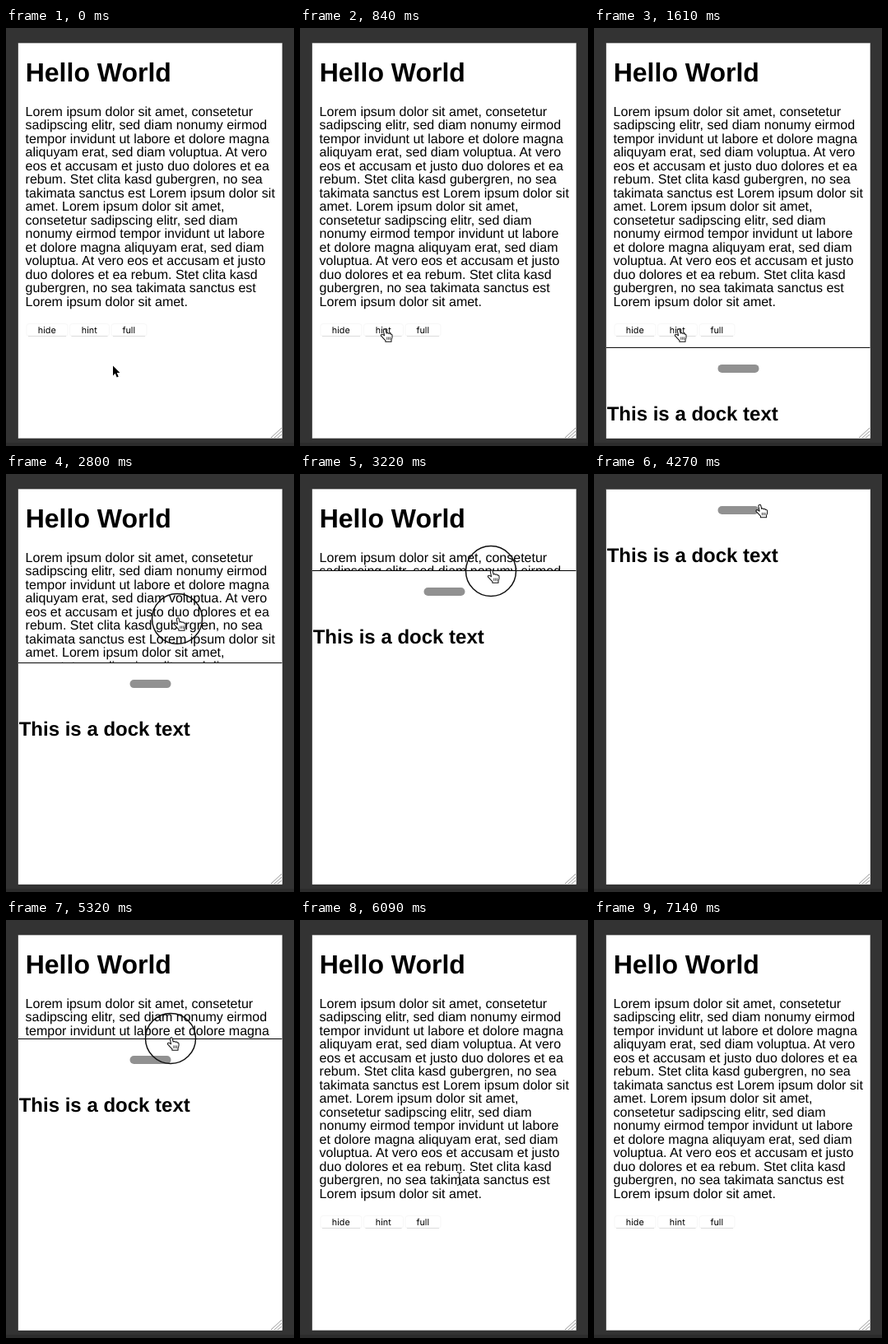
Write an HTML page that moves like this. It is 350x508 px and loops after 7.28 s.

```html
<!DOCTYPE html>
<html lang="en">
<head>
<meta charset="utf-8">
<title>Dock demo</title>
<style>
  html, body { margin: 0; width: 100%; height: 100%; overflow: hidden; background: #333; }
  svg { display: block; width: 350px; height: 508px; }
  text { font-family: "Liberation Sans", Arial, sans-serif; text-rendering: geometricPrecision; }
  .bold { font-weight: 700; }
  .label { font: 10.8px Inter, sans-serif; text-anchor: middle; }
</style>
</head>
<body>
<svg viewBox="0 0 350 508">
  <clipPath id="page"><rect x="15" y="18.5" width="320.5" height="480"/></clipPath>
  <rect width="350" height="508" fill="#333"/>
  <rect y="504" width="350" height="4" fill="#2c2c2c"/>
  <rect x="15" y="18.5" width="320.5" height="480" stroke="#777"/>
  <g clip-path="url(#page)">
    <rect width="350" height="508" fill="#fff"/>
    <text class="bold" x="23.7" y="65.2" font-size="32">Hello World</text>
    <g id="copy" font-size="16"></g>
    <g id="buttons"></g>
    <g id="dock">
      <rect width="350" height="500" fill="#fff"/>
      <rect width="350" height="1"/>
      <rect x="150.5" y="21" width="50" height="10" rx="5" fill="#919191"/>
      <text class="bold" x="15.7" y="89.2" font-size="24">This is a dock text</text>
    </g>
    <path d="M322 498L335 486M326 498L335 490M330 498L335 494" stroke="#999" fill="none"/>
  </g>
  <g id="pointer">
    <circle id="ring" fill="none" stroke="#111" stroke-width="1.5"/>
    <path id="arrow" transform="scale(.88)" d="M0 0V13.5L3.1 10.6L5.3 15.9L7.6 15L5.4 9.8H9.6Z" stroke="#fff" paint-order="stroke" stroke-width="1.6"/>
    <g id="hand" transform="translate(0 -.7) scale(.94)" fill="#fff" stroke="#111" stroke-width="1.1" stroke-linejoin="round">
      <path d="M0 0C1-1 2-.5 2.3 .6L3.4 5C4 4 5.6 4.2 6 5.4C7 4.7 8.3 5 8.6 6.2C9.6 5.8 10.6 6.4 10.7 7.6C11 10 10.6 11.6 9.6 13.5V16H2V14.2C0 12.4-1.8 10.2-3.4 8.6C-4.8 7.2-3 5.6-1.2 6.8L.6 8L-.7 1.6C-.8 .9-.5 .3 0 0Z"/>
      <path d="M4 9.8v3.6M6 9.8v3.6M8 9.8v3.6" stroke-width=".8"/>
    </g>
    <path id="beam" d="M-3-8Q0-8 0-6Q0-8 3-8M0-6V6M-3 8Q0 8 0 6Q0 8 3 8" fill="none" stroke="#111"/>
  </g>
</svg>
<script>
const LOOP = 7280, STEP = 70;
const HIDDEN = 500, HINT = 387, FULL = 18;
const $ = id => document.getElementById(id);

const copy = `Lorem ipsum dolor sit amet, consetetur
sadipscing elitr, sed diam nonumy eirmod
tempor invidunt ut labore et dolore magna
aliquyam erat, sed diam voluptua. At vero
eos et accusam et justo duo dolores et ea
rebum. Stet clita kasd gubergren, no sea
takimata sanctus est Lorem ipsum dolor sit
amet. Lorem ipsum dolor sit amet,
consetetur sadipscing elitr, sed diam
nonumy eirmod tempor invidunt ut labore
et dolore magna aliquyam erat, sed diam
voluptua. At vero eos et accusam et justo
duo dolores et ea rebum. Stet clita kasd
gubergren, no sea takimata sanctus est
Lorem ipsum dolor sit amet.`;
$('copy').innerHTML = copy.split('\n')
  .map((line, i) => `<text x="23.6" y="${106.6 + i * 16.5}">${line}</text>`).join('');

$('buttons').innerHTML = [['hide', 25, 50], ['hint', 77.5, 48], ['full', 128, 43]]
  .map(([name, x, w]) => `
    <rect x="${x}" y="359.5" width="${w}" height="15" rx="3" fill="#fff" stroke="#f7f7f7"/>
    <path d="M${x + 2} 374.5h${w - 4}" stroke="#dcdcdc"/>
    <text class="label" x="${x + w / 2 - .2}" y="370.6">${name}</text>`).join('');

// Each move: start, end, then where it arrives.
const pointerMoves = [
  [0, 700, 102, 367],      // to the hint button
  [2030, 2310, 195, 356],
  [2590, 2800, 208, 176],  // drag up
  [2800, 3150, 232, 118],
  [3430, 3850, 270, 87],
  [3990, 4340, 200, 38],   // to the handle
  [4760, 5040, 200, 144],  // drag down
  [5880, 6650, 190, 421],
  [6790, 7140, 167, 512]   // out of view
];
const dockMoves = [
  [1330, 1680, HINT],
  [2657, 3220, 117],
  [3430, 3850, FULL],
  [4760, 5110, 144],
  [5460, 5670, HIDDEN]
];
// start, end, ring radius
const presses = [[700, 840, 22], [2520, 3500, 30.5], [4620, 5530, 30.5]];

const easeOut = k => 1 - (1 - k) ** 3;

function follow(from, moves, t) {
  return moves.reduce((at, [start, end, ...to]) => {
    const k = easeOut(Math.min(1, Math.max(0, (t - start) / (end - start))));
    return at.map((v, i) => v + (to[i] - v) * k);
  }, from);
}

function cursorAt(t, y) {
  if (t >= 5530) return y < 340 ? 'beam' : 'arrow';
  return y < 376 ? 'hand' : 'arrow';
}

const show = (id, on) => { $(id).style.display = on ? '' : 'none'; };

function draw(t) {
  const [x, y] = follow([130, 410.5], pointerMoves, t);
  const [top] = follow([HIDDEN], dockMoves, t);
  const press = presses.find(([start, end]) => t >= start && t < end);
  const cursor = cursorAt(t, y);

  $('dock').setAttribute('transform', `translate(0 ${top})`);
  $('pointer').setAttribute('transform', `translate(${x} ${y})`);
  for (const id of ['arrow', 'hand', 'beam']) show(id, id === cursor);
  show('ring', press);
  if (press) $('ring').setAttribute('r', press[2]);
}

const start = performance.now();
function tick() {
  const t = (performance.now() - start) % LOOP;
  draw(Math.floor(t / STEP) * STEP);
  requestAnimationFrame(tick);
}
tick();
</script>
</body>
</html>
```
